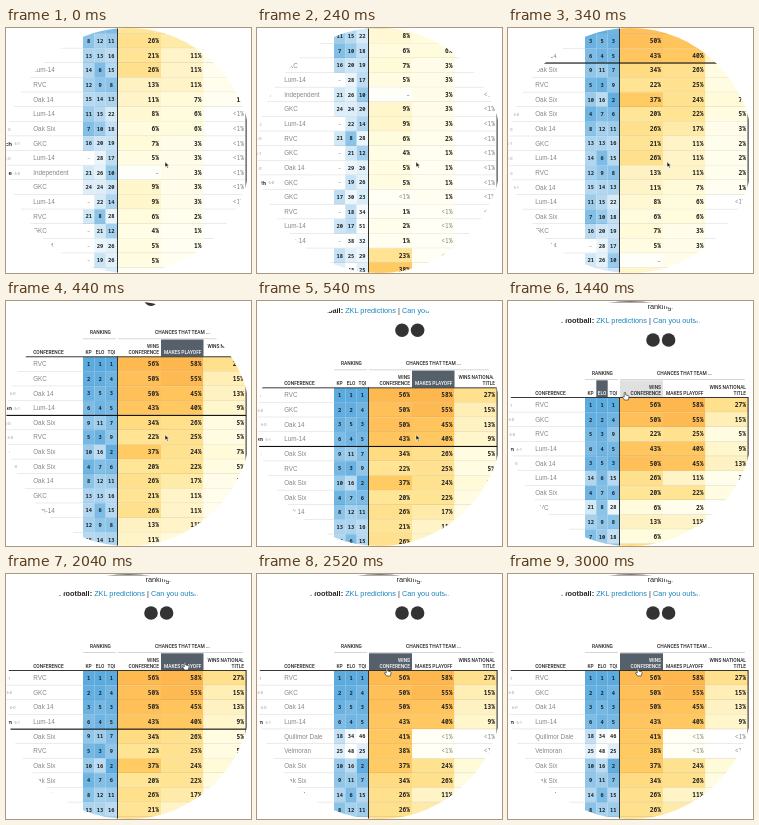
Write an HTML page that moves like this. It is 245 by 245 pixels and loops after 3.02 s.

```html
<!DOCTYPE html>
<html lang="en">
<head>
<meta charset="utf-8">
<style>
html, body { margin: 0; width: 100%; height: 100%; overflow: hidden; background: #fff; }
svg { display: block; width: 100vw; height: 100vh; }
text { font-family: "Liberation Sans", Arial, sans-serif; fill: #222; }
.intro { font-size: 7.35px; }
.head { font: 500 4.85px Roboto, sans-serif; }
.league { font-size: 6.35px; fill: #888; }
.rank { font: 700 5.4px "Noto Sans Mono", monospace; }
.pct { font: 600 6.2px "Noto Sans Mono", monospace; }
.low { fill: #808080; font-weight: 400; }
.team { font: 700 6.2px "Liberation Sans", Arial, sans-serif; }
.record { font: 4px Roboto, sans-serif; fill: #999; }
</style>
</head>
<body>
<svg viewBox="0 0 245 245">
  <clipPath id="lens"><circle cx="122.5" cy="122.5" r="122.5"/></clipPath>
  <g clip-path="url(#lens)">
    <g id="page"></g>
    <g id="cursor" stroke="#fff" stroke-width=".6">
      <path id="arrow" d="M0 0V5.6L1.4 4.4L2.4 6.5L3.3 6L2.4 4.1H4.1Z" fill="#111"/>
      <path id="hand" d="M-.8 0.7Q0 -.5 .7 .7V3L3.5 3.7Q4.3 4 4 5L3.3 8H-.5L-2.6 5Q-2.2 4-.8 5Z" fill="#fff" stroke="#222"/>
    </g>
  </g>
</svg>
<script>
const LOOP = 3020, STEP = 20;
const ROW_H = 14.63, TOP = 96.7;
const SLOTS = 31;
const RANK_X = [77, 88.3, 99.7, 111];
const PCT_X = [112, 155, 197.5, 240];

const LEAGUES = {
  R: 'RVC', G: 'GKC', O: 'Oak 14', S: 'Oak Six', L: 'Lum-14',
  Q: 'Quillmor Dale', V: 'Velmoran', I: 'Independent'
};

// league, three ranks, conference, playoff and title chances
const LEADERS = `R 1 1 1 56 58 27
G 2 2 4 50 55 15
O 3 5 3 50 45 13
L 6 4 5 43 40 9
S 9 11 7 34 26 5
R 5 3 9 22 25 5
S 10 16 2 37 24 7
S 4 7 6 20 22 5
O 8 12 11 26 17 3
G 13 13 16 21 11 2
L 14 6 15 26.5 11 2
R 12 9 8 13 11 2
O 15 14 13 11 7 1`;

// league, three ranks, conference chance
const CHASERS = `L 11 15 22 8
S 7 10 18 6
G 16 20 19 7
L - 28 17 5
I 21 26 10 -
G 24 24 20 9
L - 22 14 9
R 21 8 28 6
G - 21 12 4
O - 29 26 5
G - 19 26 5
G 17 30 23 .5
R - 18 34 1
L 20 17 51 2
L - 38 32 1
V 18 25 29 23
V 25 48 25 38
Q 18 34 46 41`;

const chaserPlayoff = i => i < 2 ? 6 : i < 7 ? 3 : i < 8 ? 2 : i < 12 ? 1 : .5;

// visible ends of the team names, by row
const TAILS = { 3: ['on', 14], 15: ['ech', 14], 17: ['e', 14], 23: ['th', 17], 2: ['', 9.5], 5: ['', 7], 7: ['', 11], 12: ['', 11], 1: ['', 6] };

const BLUES = [[1, 92, 171, 222], [7, 130, 191, 231], [13, 172, 212, 239], [22, 214, 234, 248], [30, 240, 247, 252], [40, 255, 255, 255]];
const GOLDS = [[0, 255, 255, 250], [1, 255, 254, 240], [6, 255, 252, 222], [9, 255, 246, 204], [13, 255, 242, 194],
  [20, 255, 229, 150], [34, 255, 219, 130], [37, 255, 203, 98], [50, 255, 191, 89], [58, 253, 183, 78]];

const page = document.getElementById('page');

function add(parent, tag, attrs, text) {
  const el = document.createElementNS('http://www.w3.org/2000/svg', tag);
  for (const k in attrs) el.setAttribute(k, attrs[k]);
  if (text !== undefined) el.textContent = text;
  parent.append(el);
  return el;
}
const rect = (p, x, y, width, height, fill) => add(p, 'rect', { x, y, width, height, fill });
const label = (p, cls, x, y, text, anchor = 'start') => add(p, 'text', { class: cls, x, y, 'text-anchor': anchor }, text);

function shade(stops, v) {
  let i = 1;
  while (i < stops.length - 1 && v > stops[i][0]) i++;
  const a = stops[i - 1], b = stops[i];
  const u = Math.max(0, Math.min(1, (v - a[0]) / (b[0] - a[0])));
  return `rgb(${[1, 2, 3].map(k => Math.round(a[k] + (b[k] - a[k]) * u))})`;
}

function parse(line, i) {
  const [league, ...vals] = line.split(' ');
  const nums = vals.map(v => v === '-' ? NaN : +v);
  const odds = nums.slice(3);
  if (odds.length === 1) odds.push(chaserPlayoff(i), .5);
  return { league, ranks: nums.slice(0, 3), odds };
}
const teams = [...LEADERS.split('\n').map(parse), ...CHASERS.split('\n').map(parse)];

function drawRow(team, i) {
  const g = add(page, 'g', {});
  const base = 9.4;
  const [tail, end] = TAILS[i] || ['', 4.5];
  label(g, 'record', end, base - .3, i % 3 === 0 ? '6-1' : '6-0', 'end');
  if (tail) label(g, 'team', end - 8, base, tail, 'end');
  label(g, 'league', 27.2, base, LEAGUES[team.league]);
  team.ranks.forEach((r, k) => {
    const x = RANK_X[k], w = RANK_X[k + 1] - x;
    if (r) rect(g, x, 0, w, ROW_H, shade(BLUES, r));
    label(g, r ? 'rank' : 'rank low', x + w / 2, base - .2, r || '–', 'middle');
  });
  team.odds.forEach((v, k) => {
    const x = PCT_X[k], right = PCT_X[k + 1];
    if (k < 2 || v >= 1) rect(g, x, 0, right - x, ROW_H, shade(GOLDS, v || 0));
    const text = isNaN(v) ? '–' : v < 1 ? '<1%' : Math.floor(v) + '%';
    label(g, v >= 1 ? 'pct' : 'pct low', right - 2.1, base, text, 'end');
  });
  rect(g, 0, ROW_H - .5, 240, .5, 'rgba(90,90,90,.24)');
  return g;
}

function drawIntro() {
  rect(page, 82, 0, 78, 1.6, '#777');
  label(page, 'intro', 139.5, 8.3, 'ranking.');
  const line = label(page, 'intro', 51, 21.6, '');
  const span = (text, style) => add(line, 'tspan', { style }, text);
  span('e football: ', 'font-weight:700');
  span('ZKL predictions', 'fill:#1a84bd');
  span(' | ', 'fill:#222');
  span('Can you outsmart', 'fill:#1a84bd');
  for (const cx of [145, 160.6]) add(page, 'circle', { cx, cy: 39, r: 6.8, fill: '#333' });
}

function drawHeader() {
  label(page, 'head', 94.5, 74, 'RANKING', 'middle');
  label(page, 'head', 176.5, 74, 'CHANCES THAT TEAM ...', 'middle');
  rect(page, 77, 78.3, 33, .6, '#bbb');
  rect(page, 112, 78.3, 128, .6, '#bbb');
  label(page, 'head', 27.2, 93.7, 'CONFERENCE');
  const [kp, elo, tqi, rankEnd] = RANK_X;
  const [conf, playoff, title, end] = PCT_X;
  const cols = [
    ['kp', kp, elo, 'KP'], ['elo', elo, tqi, 'ELO'], ['tqi', tqi, rankEnd, 'TQI'],
    ['conf', conf, playoff, 'WINS', 'CONFERENCE'], ['playoff', playoff, title, 'MAKES PLAYOFF'],
    ['title', title, end, 'WINS NATIONAL', 'TITLE']
  ];
  return cols.map(([key, x, end, ...lines]) => {
    const box = rect(page, x, 79.3, end - x, 17, 'none');
    const narrow = end - x < 20;
    const texts = lines.map((s, i) => label(page, 'head', narrow ? (x + end) / 2 : end - 2,
      93.7 - 5.7 * (lines.length - 1 - i), s, narrow ? 'middle' : 'end'));
    return { key, x, end, box, texts };
  });
}

drawIntro();
const heads = drawHeader();
const rows = teams.map(drawRow);
rect(page, 0, 96.1, 240, .9, '#222');
rect(page, 111, 96, 1, SLOTS * ROW_H, '#333');
rect(page, 239.6, 96, 1, SLOTS * ROW_H, '#222');
const cutoff = rect(page, 0, TOP + 4 * ROW_H - .6, 240, 1.1, '#111');

const rankBy = score => teams.map((_, i) => i).sort((a, b) => score(teams[b]) - score(teams[a]) || a - b);
const ORDERS = {
  playoff: teams.map((_, i) => i),
  elo: rankBy(t => -t.ranks[1]),
  conf: rankBy(t => t.odds[0] || 0)
};

const SORTS = [[0, 'playoff'], [1160, 'elo'], [1840, 'playoff'], [2460, 'conf']];
const PATH = [[0, 159, 133.7], [600, 159, 133.7], [1060, 94, 90], [1240, 94, 90], [1440, 117, 91],
  [1760, 179, 88], [2080, 179, 88], [2420, 130, 94], [LOOP, 130, 94]];

// glide down to the far end of the table, then fly back up and settle
const TURN = 240, SETTLE = 560, DEPTH = -286;
function scrollAt(t) {
  if (t < TURN) return -208 + (DEPTH + 208) * Math.sin(t / TURN * Math.PI / 2);
  return DEPTH * Math.pow(Math.max(0, 1 - (t - TURN) / SETTLE), 4.41);
}

function cursorAt(t) {
  const i = PATH.findIndex(p => p[0] > t);
  const a = PATH[i - 1], b = PATH[i];
  const u = (t - a[0]) / (b[0] - a[0]);
  return [a[1] + (b[1] - a[1]) * u, a[2] + (b[2] - a[2]) * u];
}

let sorted = '';
function arrange(key) {
  if (key === sorted) return;
  sorted = key;
  ORDERS[key].forEach((team, slot) => rows[team].setAttribute('transform', `translate(0 ${TOP + slot * ROW_H})`));
  cutoff.setAttribute('visibility', key === 'playoff' ? 'visible' : 'hidden');
}

function draw(t) {
  const dy = scrollAt(t), [x, y] = cursorAt(t);
  arrange(SORTS.filter(s => s[0] <= t).pop()[1]);
  page.setAttribute('transform', `translate(0 ${dy})`);
  const overHead = y - dy > 79 && y - dy < 97;
  for (const h of heads) {
    const on = h.key === sorted;
    const hover = overHead && x >= h.x && x < h.end;
    h.box.setAttribute('fill', on ? '#55606b' : hover ? '#e0e0e0' : 'none');
    h.texts.forEach(el => el.style.fill = on ? '#fff' : '#222');
  }
  document.getElementById('cursor').setAttribute('transform', `translate(${x} ${y})`);
  document.getElementById('arrow').setAttribute('visibility', overHead ? 'hidden' : 'visible');
  document.getElementById('hand').setAttribute('visibility', overHead ? 'visible' : 'hidden');
}

const start = performance.now();
function tick() {
  const t = (performance.now() - start) % LOOP;
  draw(Math.floor(t / STEP) * STEP);
  requestAnimationFrame(tick);
}
tick();
</script>
</body>
</html>
```
